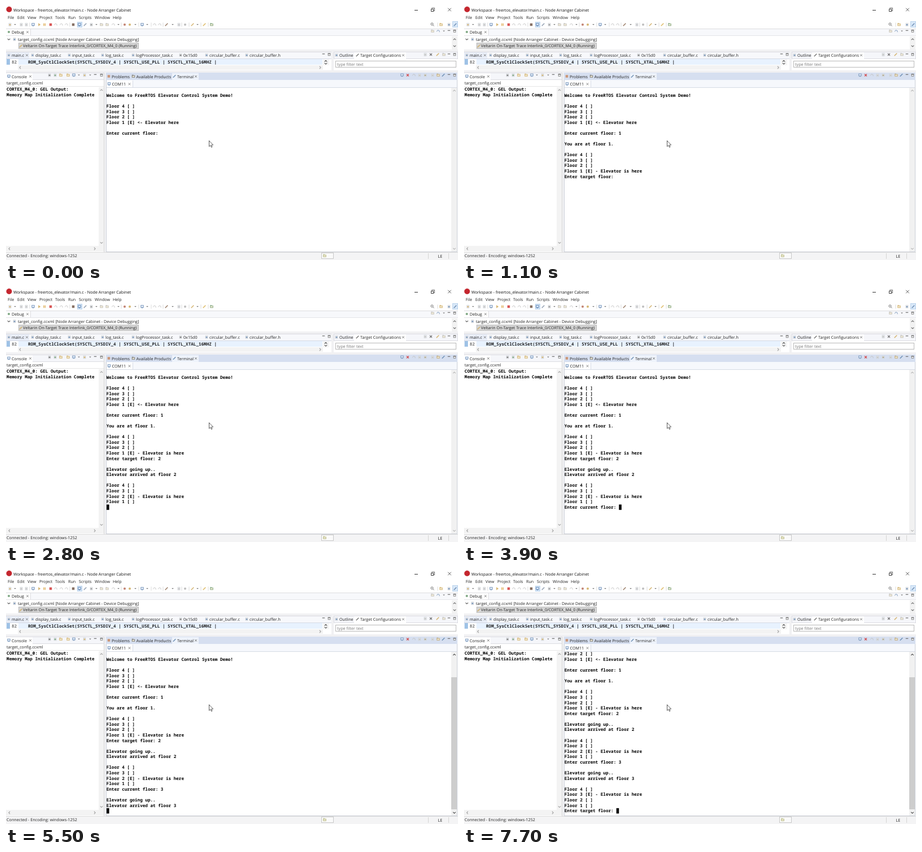
An HTML page with a canvas for the animation above (8000 ms loop, 800 by 450 pixels).

```html
<!DOCTYPE html>
<html lang="en">
<head>
<meta charset="utf-8">
<title>Elevator terminal</title>
<style>
html, body { margin: 0; width: 100%; height: 100%; overflow: hidden; background: #fff; }
canvas { display: block; width: 800px; height: 450px; }
</style>
</head>
<body>
<canvas id="stage" width="800" height="450"></canvas>
<script>
const ctx = document.getElementById('stage').getContext('2d');
const LOOP = 8000;
const UI = '7.2px "Open Sans", "Noto Sans", sans-serif';
const MONO = '600 7.63px "Noto Sans Mono", "DejaVu Sans Mono", monospace';
const CHAR = 4.583, ROW = 9.575, ROWS = 30, TERM_X = 177.7, TERM_Y = 144.2;
const GREY = '#bcbcbc', DARK = '#666', BLUE = '#5f82ad', GOLD = '#cfa95c', GREEN = '#6b9a70', RED = '#d23a3a';
const APP = 'Node Arranger Cabinet';

function rect(x, y, w, h, fill, stroke) {
  if (fill) { ctx.fillStyle = fill; ctx.fillRect(x, y, w, h); }
  if (stroke) { ctx.strokeStyle = stroke; ctx.lineWidth = 1; ctx.strokeRect(x + .5, y + .5, w - 1, h - 1); }
}

function path(points, color, width = 1, fill) {
  ctx.beginPath();
  points.forEach(([x, y]) => ctx.lineTo(x, y));
  if (fill) { ctx.closePath(); ctx.fillStyle = fill; ctx.fill(); }
  if (color) { ctx.strokeStyle = color; ctx.lineWidth = width; ctx.stroke(); }
}

function disc(x, y, r, color) {
  ctx.beginPath();
  ctx.arc(x, y, r, 0, Math.PI * 2);
  ctx.fillStyle = color;
  ctx.fill();
}

function text(s, x, y, color = '#222', font = UI) {
  ctx.font = font;
  ctx.fillStyle = color;
  ctx.fillText(s, x, y);
}

// Chevron pointing along (dx, dy)
function chevron(x, y, dx, dy, color = '#a0a0a0') {
  const a = 2.3, b = 1.1;
  path([[x - dx * b - dy * a, y - dy * b - dx * a], [x + dx * b, y + dy * b],
        [x - dx * b + dy * a, y - dy * b + dx * a]], color, 1.1);
}

function cross(x, y, r = 1.9, color = '#666', w = .8) {
  path([[x - r, y - r], [x + r, y + r]], color, w);
  path([[x - r, y + r], [x + r, y - r]], color, w);
}

// Each glyph is drawn around the origin
const glyphs = {
  doc(c) { rect(-2.5, -3, 5, 6, '#f8f8f8', '#c4c8ce'); rect(-1.5, -1, 3, 2.5, c); },
  box(c) { rect(-2.5, -2.5, 5, 5, c); },
  dot(c) { disc(0, 0, 2.3, c); },
  screen(c) { rect(-3, -3, 6, 5, '#e4eefa', c); rect(-1.5, 2, 3, 1, c); },
  folder(c) { rect(-3, -2, 6, 4.5, '#f3ead0', c); rect(-3, -3, 3, 1, c); },
  play(c) { path([[-2, -3], [2.5, 0], [-2, 3]], 0, 1, c); },
  pause(c) { rect(-2, -2.5, 1.5, 5, c); rect(.7, -2.5, 1.5, 5, c); },
  step(c) { path([[-3, 1], [-1, -2], [2, -1], [2.5, 2]], c, 1); },
  pen(c) { path([[-2.5, 2.5], [2.5, -2.5]], c, 1.8); },
  more(c) { path([[-2, -1], [2, -1], [0, 1]], 0, 1, c); },
  bar(c) { rect(-.5, -4, 1, 8, c); },
  min(c) { rect(-2.5, -2, 5, 1.5, c); },
  max(c) { rect(-2.5, -2.5, 5, 5, '#fff', c); rect(-2.5, -2.5, 5, 1.5, c); },
  x(c) { cross(0, 0, 2.2, c, 1.4); }
};

function icon(kind, x, y, color) {
  ctx.save();
  ctx.translate(x, y);
  ctx.scale(.9, .9);
  ctx.globalAlpha = .85;
  glyphs[kind](color);
  ctx.restore();
}

function icons(y, list) {
  for (const [kind, color, ...xs] of list) xs.forEach(x => icon(kind, x, y, color));
}

function tab(x, y, label, kind, color, closeX) {
  icon(kind, x - 5, y - 3, color);
  text(label, x, y);
  if (closeX) cross(closeX, y - 2.7);
}

function titleBar() {
  disc(5.5, 6, 5, '#c4262e');
  text('Workspace - freertos_elevator/main.c - ' + APP, 13, 9.6, '#111');
  rect(723, 7, 6, 1, '#333');
  rect(752, 5, 5, 5, 0, '#444');
  path([[753.5, 4.5], [753.5, 3.5], [758.5, 3.5], [758.5, 8.5], [757, 8.5]], '#444', .8);
  cross(785, 6.5, 2.8, '#333');
  const menu = { File: 3, Edit: 20, View: 38, Project: 59, Tools: 87, Run: 110, Scripts: 129, Window: 157, Help: 189 };
  for (const name in menu) text(name, menu[name], 23);
}

function toolBar() {
  rect(126, 28, 9, 10, '#d9e8f8', '#b9d2ec');
  icons(33, [
    ['doc', GOLD, 7], ['doc', GREY, 27, 36], ['screen', BLUE, 48, 241],
    ['more', DARK, 16, 160, 199, 229, 250, 295, 339],
    ['bar', '#d0d0d0', 42, 113, 204, 235, 257, 278, 311, 324, 345, 358, 764],
    ['play', GOLD, 59], ['pause', '#d9a03c', 68], ['box', RED, 79],
    ['step', GREY, 88, 98, 107, 263, 272], ['box', '#73594a', 119],
    ['screen', '#3e6ea4', 130], ['pen', '#8292a6', 140], ['doc', '#8a8a8a', 151],
    ['folder', GREY, 169, 179], ['step', GREY, 190], ['dot', '#b8705c', 210], ['dot', GOLD, 219],
    ['pen', '#8b6a50', 284], ['doc', GREY, 306], ['dot', '#b4b4b4', 317],
    ['pen', GOLD, 330], ['pen', '#d8b050', 351], ['folder', GREEN, 364], ['folder', GOLD, 770]
  ]);
  ctx.beginPath();
  ctx.arc(754, 32, 2, 0, 7);
  ctx.strokeStyle = DARK; ctx.lineWidth = .9; ctx.stroke();
  path([[755.5, 33.5], [757.5, 35.5]], DARK, 1);
  icon('doc', 784, 33, BLUE);
  rect(790, 27, 10, 11, '#d9e8f8', '#b9d2ec');
  icon('pen', 795, 33, BLUE);
}

function debugView() {
  rect(0, 40, 800, 13, '#f7f8fb');
  rect(0, 40, 800, 1, '#dcdce0');
  rect(0, 41, 43, 12, '#fff');
  rect(43, 41, 1, 12, '#dcdce0');
  rect(0, 52, 800, 1, '#e4e4e8');
  tab(10, 49, 'Debug', 'dot', GREEN, 38);
  icons(44.5, [['folder', GREY, 755], ['step', BLUE, 765], ['more', DARK, 775], ['min', DARK, 784], ['max', DARK, 794]]);
  rect(0, 53, 800, 24, '#fff');
  chevron(5, 59, 0, 1, '#555');
  icon('doc', 15, 59, BLUE);
  text(`target_config.ccxml [${APP} - Device Debugging]`, 21, 62);
  rect(22, 65, 213, 11, '#d6d6d6', '#bcbcbc');
  icon('pen', 26, 71, GOLD);
  text('Veltarin On-Target Trace Interlink_0/CORTEX_M4_0 (Running)', 30, 73.3);
  rect(789, 54, 10, 23, '#f2f2f2');
  chevron(794, 59, 0, -1, '#666');
  chevron(794, 71, 0, 1, '#666');
}

function editor() {
  rect(0, 77, 800, 4, '#f1f1f3');
  rect(0, 81, 577, 13, '#f7f8fb');
  rect(0, 81, 41, 13, '#e9eef8');
  rect(0, 81, 577, 1, '#d8d8de');
  rect(0, 93, 577, 1, '#d5d9e4');
  tab(10, 90, 'main.c', 'doc', BLUE, 37);
  const files = { 'display_task.c': 52, 'input_task.c': 117, 'log_task.c': 176, 'logProcessor_task.c': 230,
    '0x15d0': 314, 'circular_buffer.c': 360, 'circular_buffer.h': 431 };
  for (const name in files) tab(files[name], 90, name, 'doc', name[0] === '0' ? DARK : BLUE);
  icons(86, [['min', DARK, 562], ['max', DARK, 572]]);
  rect(0, 94, 577, 20, '#fff');
  rect(22, 94, 538, 10, '#e8f2fe');
  rect(1, 94, 6, 10, '#9fc2e6');
  text('82', 10, 102, '#7a7a7a', MONO);
  text('ROM_SysCtlClockSet(SYSCTL_SYSDIV_4 | SYSCTL_USE_PLL | SYSCTL_XTAL_16MHZ |', 39, 102, '#222', MONO);
  rect(561, 94, 11, 11, '#f5f5f5');
  chevron(566, 97.5, 0, -1, '#555');
  chevron(566, 102, 0, 1, '#555');
  rect(21, 105, 540, 8, '#f3f3f3');
  chevron(25, 109, -1, 0);
  chevron(556, 109, 1, 0);
  rect(576, 81, 4, 36, '#f1f1f3');
}

function outline() {
  rect(580, 81, 220, 13, '#f5f6fa', '#dcdce2');
  rect(616, 82, 92, 12, '#fff');
  tab(590, 90, 'Outline', 'doc', BLUE);
  tab(627, 90, 'Target Configurations', 'pen', DARK, 703);
  icons(86, [['doc', GREY, 742], ['x', DARK, 752], ['pen', GOLD, 764], ['folder', GREY, 775], ['min', DARK, 784], ['max', DARK, 794]]);
  rect(580, 94, 220, 20, '#fff');
  rect(583, 97, 214, 12, '#fff', '#b8b8b8');
  text('type filter text', 586, 105.6, '#777');
}

function consoleView() {
  rect(0, 114, 800, 4, '#f1f1f3');
  rect(0, 118, 174, 13, '#f5f6fa', '#dcdce2');
  rect(0, 119, 47, 13, '#fff');
  tab(10, 127.5, 'Console', 'screen', BLUE, 43);
  icons(122.5, [['doc', DARK, 77], ['doc', GREEN, 87], ['folder', GOLD, 97, 110], ['screen', BLUE, 120],
    ['more', DARK, 129, 149], ['doc', GOLD, 139], ['min', DARK, 158], ['max', DARK, 169]]);
  rect(0, 132, 174, 304, '#fff');
  text('target_config.ccxml', 1, 139);
  rect(0, 142, 174, 1, '#e6e6e6');
  text('CORTEX_M4_0: GEL Output:', 1.1, 150, '#000', MONO);
  text('Memory Map Initialization Complete', 1.1, 159.6, '#000', MONO);
  rect(164, 144, 10, 281, '#f3f3f3');
  rect(0, 425, 174, 10, '#f3f3f3');
  chevron(169, 149, 0, -1);
  chevron(169, 419.5, 0, 1);
  chevron(6, 430, -1, 0);
  chevron(157, 430, 1, 0);
  rect(174, 118, 3, 319, '#f1f1f3');
  rect(173, 118, 1, 318, '#d8d8d8');
}

function terminalFrame(scrolled) {
  rect(177, 118, 622, 318, '#fff', '#ccd0d8');
  rect(177, 118, 622, 13, '#d6dff0');
  rect(294, 119, 47, 13, '#eef3fb');
  tab(187, 127.5, 'Problems', 'box', '#c98a62');
  tab(230.5, 127.5, 'Available Products', 'folder', DARK);
  tab(303, 127.5, 'Terminal', 'pen', BLUE, 336);
  icons(122.5, [['screen', BLUE, 701], ['x', RED, 711], ['step', GREY, 722], ['doc', GREY, 732], ['doc', '#a39a7c', 742],
    ['doc', GREY, 755], ['folder', '#b89d6a', 765], ['pen', BLUE, 774], ['min', DARK, 784], ['max', DARK, 794]]);
  rect(178, 131, 620, 14, '#f6f8fc');
  rect(178, 132, 46, 13, '#fff');
  rect(224, 132, 1, 12, '#d6dbe6');
  rect(178, 144, 620, 1, '#d6dbe4');
  tab(187.5, 141, 'COM11', 'screen', BLUE, 218.5);
  rect(788, 145, 10, 290, '#f1f1f1');
  if (scrolled) rect(788, 190, 10, 234, '#cdcdcd');
  const arrow = scrolled ? '#444' : '#b5b5b5';
  chevron(793.5, 150, 0, -1, arrow);
  chevron(793.5, 430, 0, 1, arrow);
}

function statusBar() {
  rect(0, 436, 800, 14, '#f4f4f5');
  rect(0, 436, 800, 1, '#dcdcdc');
  text('Connected - Encoding: windows-1252', 1, 445.3);
  rect(558, 437, 22, 11, '#fafafa', '#c8c8c8');
  icon('folder', 564, 442.5, '#a8b074');
  rect(747, 438, 1, 10, '#d4d4d4');
  rect(783, 438, 1, 10, '#d4d4d4');
  text('LE', 764.5, 445.8);
}

function pointer() {
  path([[359.5, 238.8], [359.5, 249], [361.9, 246.9], [363.5, 250.4], [365, 249.7], [363.5, 246.3],
        [366.6, 246.1], [359.5, 238.8], [359.5, 240]], '#333', .8, '#fff');
}

const floors = (at, note = '- Elevator is here') =>
  [4, 3, 2, 1].map(n => `Floor ${n} ` + (n === at ? '[E] ' + note : '[ ]')).join('\n');
const ride = n => `${n}\n\nElevator going up..\nElevator arrived at floor ${n}\n`;
const ask = what => `Enter ${what} floor: `;

// [time, output added, caret shown]
const events = [
  [0, '\nWelcome to FreeRTOS Elevator Control System Demo!\n\n' + floors(1, '<- Elevator here') + '\n\n' + ask('current'), 0],
  [400, '1\n\nYou are at floor 1.\n', 1],
  [500, '\n' + floors(1) + '\n', 1],
  [800, ask('target'), 1], [1100, '', 0], [1700, '', 1], [2300, '', 0],
  [2800, ride(2) + '\n' + floors(2) + '\n', 1],
  [3000, ask('current'), 1], [3300, '', 0], [3900, '', 1], [4500, '', 0], [4900, '', 1],
  [5500, ride(3), 1],
  [5800, '\n' + floors(3) + '\n' + ask('target'), 1],
  [6300, '', 0], [6700, '', 1], [7400, '', 0], [7700, '', 1]
];

function terminal(t) {
  const past = events.filter(e => e[0] <= t);
  const lines = past.map(e => e[1]).join('').split('\n');
  const caret = past[past.length - 1][2];
  terminalFrame(lines.length >= ROWS);
  const shown = lines.slice(-ROWS);
  shown.forEach((line, i) => text(line, TERM_X, TERM_Y + i * ROW + 7.2, '#000', MONO));
  if (caret) {
    const row = shown.length - 1;
    rect(TERM_X + .3 + shown[row].length * CHAR, TERM_Y + row * ROW, CHAR, ROW, '#000');
  }
}

function draw(t) {
  ctx.textRendering = 'geometricPrecision';
  rect(0, 0, 800, 450, '#fff');
  titleBar();
  toolBar();
  debugView();
  editor();
  outline();
  consoleView();
  terminal(t);
  statusBar();
  pointer();
}

const start = performance.now();
function tick() {
  draw((performance.now() - start) % LOOP);
  requestAnimationFrame(tick);
}
tick();
</script>
</body>
</html>
```
